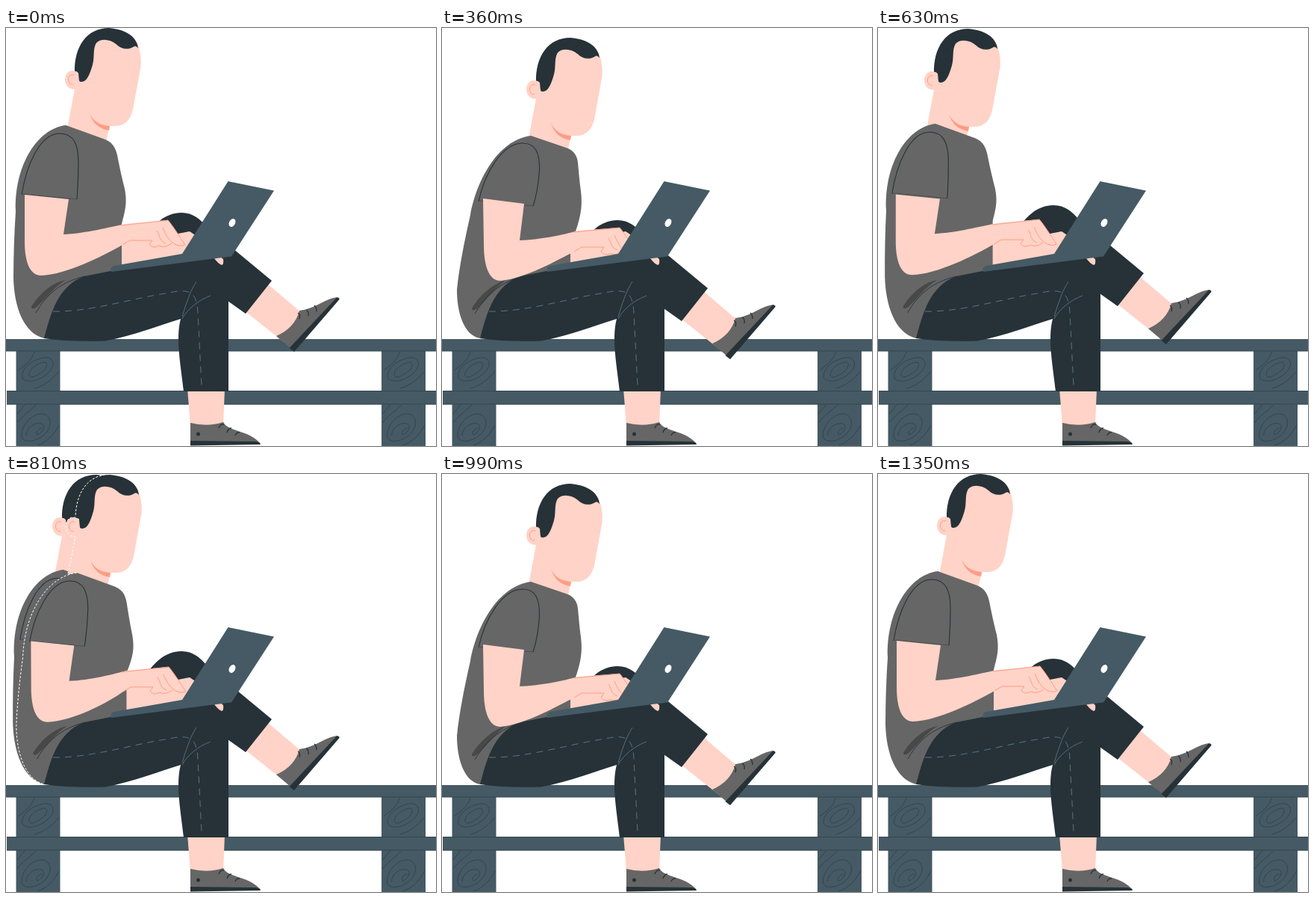
Write an HTML page with a canvas that moves like this. It is 576 px wide and 559 px high and loops after 1440 ms.

```html
<!DOCTYPE html>
<html lang="en">
<head>
<meta charset="utf-8">
<title>Working on a bench</title>
<style>
html, body { margin: 0; width: 100%; height: 100%; overflow: hidden; background: #fff; }
canvas { display: block; width: 576px; height: 559px; }
</style>
</head>
<body>
<canvas id="stage"></canvas>
<script>
const W = 576, H = 559, STEP = 90, WRIST = 150;
const NAVY = '#263238', SLATE = '#455a64', GREY = '#666', SKIN = '#ffd3c7', CORAL = '#ff9c85';
const canvas = document.getElementById('stage');
const ctx = canvas.getContext('2d');
const ratio = window.devicePixelRatio || 1;
canvas.width = W * ratio;
canvas.height = H * ratio;

// Half a cycle, played forwards and then backwards:
// body = lean x, lean y; arm = lean x, hand lean x, lean y; head = offset; leg = drop
const upright = { body: [0, 0], arm: [0, 0, 0] };
const rising = { body: [.38, .15], arm: [.28, .05, .1] };
const leaning = { body: [.58, .75], arm: [.65, .52, .9] };
const forward = { body: [1, 1], arm: [1, 1, 1] };
const farBack = { body: [-.08, -.14], arm: [-.04, -.04, -.1] };
const poses = [
  { ...upright, head: [0, 0], leg: 0 },
  { ...rising, head: [11, 2], leg: 10 },
  { ...leaning, head: [20, 10], leg: 20 },
  { ...forward, head: [35, 13], leg: 20 },
  { ...forward, head: [34, 13], leg: 10 },
  { ...leaning, head: [11, 12], leg: 0 },
  { ...rising, head: [1, 1], leg: -10 },
  { ...farBack, head: [-17, 1], leg: -10 }
];

// Each pair is a path leaning back and the same path leaning forward.
const back = [
  'M80 130C41 135 11 185 13 245C11 275 10 305 10 335C11 372 23 408 51 415',
  'M119 144C74 150 46 205 38 250C30 285 23 320 20 350C20 380 29 411 51 415'
];
const shirt = [
  back[0] + 'L110 380L155 325L155 262C161 240 162 232 159 215C154 195 152 185 149 170C146 157 141 152 130 148Z',
  back[1] + 'L110 380L172 325L172 290C188 252 188 236 186 218C184 203 183 190 182 180C181 169 175 163 166 160Z'
];
const fold = [
  'M34 373C44 356 62 340 80 337C64 346 54 362 40 374C37 376 34 376 34 373',
  'M40 375C50 358 68 342 86 337C70 348 60 364 46 376C43 378 40 378 40 375'
];
const crease = ['M40 381C52 360 70 340 106 332', 'M44 382C56 362 74 341 108 332'];
const sleeve = [
  'M21 223C27 185 45 141 72 141C92 141 97 158 97 180C97 205 96 215 95 229',
  'M49 232C57 195 80 154 108 154C126 154 131 168 130.500 190C129 212 126 226 122 238'
];
const cuff = ['M21 222L95 229', 'M49 231L122 238'];
const arm = [
  'M25 223L84 229L77 276C105 275 140 266 160 262L217 257C223 264 232 278 240 290C236 292 230 288 226 284L222 288Q212 295 205 291Q196 296 192 289L196 284L165 285L156 290C130 305 80 330 47 331C33 331 25 315 25 285Z',
  'M55 228L110 235L104 284C130 283 162 277 182 271L238 267C244 274 253 288 261 299C257 301 251 297 247 293L243 297Q233 305 226 302Q217 305 213 299L217 293L186 294L177 299C155 310 112 335 78 338C63 338 56 318 56 290Z'
];
const handTop = ['M154 264L217 257C223 264 232 278 240 290', 'M176 273L238 267C244 274 253 288 261 299'];
const fingers = [
  'M156 290L166 284L196 284L192 289Q196 296 205 291Q212 295 222 288M202 271C207 278 204 284 214 288M210 267C214 277 218 284 226 289Q234 293 240 290',
  'M177 299L187 293L217 293L213 299Q217 305 226 302Q233 305 243 297M223 281C228 288 225 293 235 297M231 277C235 287 239 294 247 298Q255 302 261 299'
];

function mix([a, b], lean) {
  const end = b.match(/[\d.]+/g);
  let i = 0;
  return a.replace(/[\d.]+/g, n => {
    const u = lean(+n, i % 2 === 0);
    return (+n + (end[i++] - n) * u).toFixed(2);
  });
}

const bodyPath = (pair, [x, y]) => mix(pair, (n, isX) => isX ? x : y);
const armPath = (pair, [x, hand, y]) => mix(pair, (n, isX) => !isX ? y : n > WRIST ? hand : x);

function fill(path, color) {
  ctx.fillStyle = color;
  ctx.fill(new Path2D(path));
}

function line(path, color, width = 1, dash = []) {
  ctx.strokeStyle = color;
  ctx.lineWidth = width;
  ctx.setLineDash(dash);
  ctx.stroke(new Path2D(path));
}

function oval(x, y, rx, ry, turn, color) {
  ctx.beginPath();
  ctx.ellipse(x, y, rx, ry, turn, 0, Math.PI * 2);
  ctx.fillStyle = color;
  ctx.fill();
}

function moved(x, y, draw) {
  ctx.save();
  ctx.translate(x, y);
  draw();
  ctx.restore();
}

function post() {
  fill('M13.500 431H72.500V559H13.500Z', SLATE);
  line('M22 468C20 456 32 446 46 442C58 438 66 444 62 454C57 466 31 479 22 468' +
    'M31 465C29 457 42 448 51 447C58 447 54 457 47 461C42 464 34 470 31 465' +
    'M16 458C24 452 34 446 38 433M38 482C52 478 62 470 71 459', '#2f4049', .8);
  line('M21 547C20 530 36 515 49 516C61 518 62 532 53 542C44 552 25 557 21 547' +
    'M27 545C27 535 38 527 47 529C55 532 48 542 42 544C39 541 43 536 48 535' +
    'M15 528C22 518 33 512 40 504M42 558C54 554 64 545 71 531M15 516L25 504', '#2f4049', .8);
}

function bench() {
  post();
  moved(489.5, 0, post);
  fill('M0 416H576V432H0ZM1 485H576V503.500H1Z', SLATE);
  line('M0 432H576M1 485.500H576M1 503H576', '#34464f', 1);
}

function farLeg() {
  fill('M350 342L402 386L372 420L318 377Z', SKIN);
  fill('M393 378C416 375 428 361 445 360L381 428L362 412Q387 401 393 378', GREY);
  fill('M443 360.500Q447 360 446.500 363L386 433L379.500 428Z', NAVY);
  line('M391 381Q395 383 393 389M402 377Q406 379 405 385M413 371Q416 373 416 379', NAVY, 1.3);
  fill('M180 290C197 261 214 247 235 247C251 247 260 256 269 266L356 338L321 382L297 365L250 330Z', NAVY);
}

function farArm() {
  fill('M150 278L215 278L246 272L255 278L236 304L150 319Z', SKIN);
}

function nearLeg() {
  fill('M243 482H293L291 532H247Z', SKIN);
  fill('M247 528Q270 534 291 527C297 540 326 538 340 555L247 554Z', GREY);
  fill('M247 552L335 553Q341 554 341 557L247 558.500Z', NAVY);
  oval(257.5, 543, 2.5, 2.5, 0, NAVY);
  line('M285 535Q287 529 292 530M296 541Q298 535 302 535M307 545Q309 540 313 541', NAVY, 1.3);
  fill('M51 415C59 386 68 345 105 332L145 324L190 316L258 308C286 307 298 324 298 352V486H238C234 450 227 415 234 389C205 398 172 411 133 418.500Q85 420 51 415', NAVY);
  line('M63 379C112 380 172 361 213 355C242 349 256 348 257 382L262 478', '#607d8b', .9, [9, 7]);
  line('M274 358C257 364 242 377 236 389M255 339C246 353 241 370 236 386', '#546e7a', 1);
}

function head() {
  fill('M96 60L82 135L95 155L133 157L139 131L148 131Q165 130 170 109L179 60Q184 42 176 20L130 10L112 30Z', SKIN);
  fill('M112 114Q119 130 139 131L138 137Q118 134 112 114', CORAL);
  fill('M92 60C91 25 108 0 138 0C162 2 176 13 177 27Q174 23 171 25C163 30 154 28 148 22C139 14 126 14 121 20C116 28 119 38 116 49C112 63 108 72 101 72C96 72 98 66 95 58Z', NAVY);
  fill('M97 60C88 53 79 59 79 69C79 79 88 84 96 81L98 72Z', SKIN);
  line('M91 63C85 61 82 67 84 72C85 75 88 77 90 75', CORAL, 1);
}

function torso({ body, head: [x, y] }, outlined) {
  const edge = path => outlined && line(path, '#fff', 1, [3, 2]);
  const at = pair => bodyPath(pair, body);
  moved(x, y, () => {
    head();
    edge('M127 1C105 6 93 28 92 56M97 60C88 53 79 59 79 69C79 79 86 83 92 83L82 132');
  });
  fill(at(shirt), GREY);
  edge(at(back));
  fill(at(fold), '#484848');
  line(at(crease), NAVY, .9);
  line(at(sleeve), NAVY, 1.1);
  line(at(cuff), '#45494b', .8);
}

function nearArm(pose) {
  const at = pair => armPath(pair, pose.arm);
  fill(at(arm), SKIN);
  line(at(handTop), CORAL, 1);
  line(at(fingers), CORAL, 1);
}

function laptop() {
  fill('M279 308L287 306L291 309Q292 316 289 317Q284 315 279 308', SKIN);
  fill('M297.500 205L359 217.500L302 305.500L270 309.500L141 326Q139 319 145 318L236 302Z', SLATE);
  oval(303, 260.5, 4, 5.8, .5, '#fff');
}

function draw(now) {
  const step = Math.floor(now / STEP) % 16;
  const pose = poses[step < 8 ? step : 15 - step];
  const trail = step === 9;
  ctx.setTransform(ratio, 0, 0, ratio, 0, 0);
  ctx.fillStyle = '#fff';
  ctx.fillRect(0, 0, W, H);
  bench();
  moved(0, pose.leg, farLeg);
  if (trail) torso(poses[7]);
  farArm();
  torso(pose, trail);
  nearLeg();
  nearArm(pose);
  laptop();
}

const start = performance.now();
function tick() {
  draw(performance.now() - start);
  requestAnimationFrame(tick);
}
tick();
</script>
</body>
</html>
```
